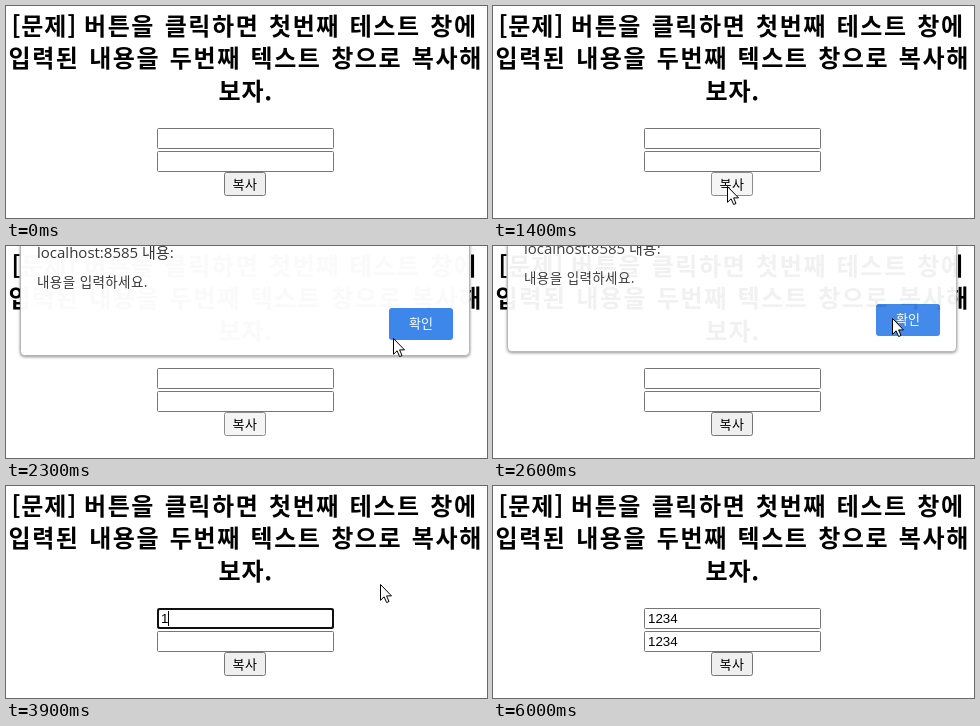
An HTML page for the animation above (6.5 s loop, 481 by 212 pixels).

```html
<!DOCTYPE html>
<html lang="ko">
<head>
<meta charset="utf-8">
<title>복사</title>
<style>
  html, body { margin: 0; width: 100%; height: 100%; overflow: hidden; background: #fff; }
  svg { display: block; width: 481px; height: 212px; }
  text { font-family: "Noto Sans CJK KR", "Noto Sans CJK", sans-serif; white-space: pre; }
  .heading { font-size: 24px; font-weight: 700; letter-spacing: 1.6px; word-spacing: 1.3px; }
  .tight { letter-spacing: .8px; }
  .field { fill: #fff; stroke: #767676; }
  .value { font: 13.333px "Liberation Sans", Arial, sans-serif; }
  .label { font-size: 13px; letter-spacing: .6px; text-anchor: middle; }
  .title { font: 15px "Open Sans", "Noto Sans CJK KR", "Noto Sans CJK", sans-serif; fill: #333; }
  .message { font-size: 13.5px; letter-spacing: .4px; fill: #333; }
  .confirm { font-size: 13px; text-anchor: middle; fill: #fff; }
  #panel { filter: drop-shadow(0 1px 1.5px rgba(0, 0, 0, .45)); }
  #button { fill: #efefef; stroke: #767676; }
  #button.hover { fill: #e5e5e5; stroke: #4f4f4f; }
  #button.active { fill: #f5f5f5; stroke: #8d8d8d; }
</style>
</head>
<body>
<svg viewBox="0 0 481 212">
  <g class="heading">
    <text class="tight" x="5.5" y="29">[문제]</text>
    <text x="78" y="29">버튼을 클릭하면 첫번째 테스트 창에</text>
    <text x="2.5" y="61">입력된 내용을 두번째 텍스트 창으로 복사해</text>
    <text class="tight" x="212.5" y="94">보자.</text>
  </g>

  <rect class="field" x="151.5" y="122.5" width="176" height="20" rx="1"/>
  <rect id="ring" x="152" y="123" width="175" height="19" rx="2" fill="#fff" stroke="#101010" stroke-width="2"/>
  <text id="first" class="value" x="155" y="137"></text>
  <rect id="caret" y="125" width="1" height="15"/>

  <rect class="field" x="151.5" y="145.5" width="176" height="20" rx="1"/>
  <text id="second" class="value" x="155" y="160"></text>

  <rect id="button" x="218.5" y="166.5" width="41" height="23" rx="2"/>
  <text class="label" x="239" y="183">복사</text>

  <g id="dialog">
    <rect id="panel" x="14.5" y="-20" width="449" height="129.5" rx="4" fill="#fff" stroke="#b4b4b4"/>
    <text class="title" x="31" y="12">localhost:8585 내용:</text>
    <text class="message" x="31" y="41">내용을 입력하세요.</text>
    <rect x="383" y="62" width="64" height="32" rx="3" fill="#3a84ea"/>
    <text class="confirm" x="415" y="82">확인</text>
  </g>

  <path id="arrow" d="M.5 .5V16.3L4.1 12.8L6.6 18.5L9 17.5L6.6 11.9H11.5Z" fill="#fff" stroke="#000"/>
  <path id="beam" d="M-3 -8.5H-1L.5 -7.5L2 -8.5H4M.5 -7.5V7.5M-3 8.5H-1L.5 7.5L2 8.5H4" fill="none" stroke="#000"/>
</svg>
<script>
const LOOP = 6500, STEP = 100;
const el = id => document.getElementById(id);
const show = (node, on) => node.setAttribute('visibility', on ? 'visible' : 'hidden');
const move = (node, x, y) => node.setAttribute('transform', `translate(${x} ${y})`);
const within = (t, from, to) => t >= from && t < to;
const ramp = (t, from, to) => Math.min(1, Math.max(0, (t - from) / (to - from)));
const easeOut = k => 1 - (1 - k) ** 1.4;

const places = {
  entry: [441, 32], button: [234, 180], confirm: [399, 72], field: [315, 133],
  rest: [374, 98], copy: [245, 187], exit: [460, 106]
};

// Each leg is one curved sweep of the hand, bent towards a control point.
const legs = [
  { start: 500, end: 1100, from: 'entry', bend: [282, 220], to: 'button' },
  { start: 1800, end: 2500, from: 'button', bend: [375, 130], to: 'confirm' },
  { start: 2600, end: 3000, from: 'confirm', bend: [328, 148], to: 'field' },
  { start: 3200, end: 3400, from: 'field', bend: [345, 118], to: 'rest' },
  { start: 4600, end: 5200, from: 'rest', bend: [310, 235], to: 'copy' },
  { start: 5600, end: 5900, from: 'copy', bend: [350, 175], to: 'exit' }
];

function pointerAt(t) {
  const leg = legs.filter(l => l.start <= t).pop() || legs[0];
  const k = easeOut(ramp(t, leg.start, leg.end));
  const a = places[leg.from], b = leg.bend, c = places[leg.to];
  return a.map((_, i) =>
    Math.round(a[i] * (1 - k) ** 2 + 2 * b[i] * k * (1 - k) + c[i] * k ** 2));
}

function buttonState(t) {
  if (within(t, 1200, 2600) || within(t, 5200, 5300)) return 'active';
  if (within(t, 1000, 1200) || within(t, 5100, 5700)) return 'hover';
  return '';
}

function drawPointer(t) {
  const [x, y] = pointerAt(t);
  const visible = within(t, 500, 6000);
  const inField = within(t, 2900, 3300);
  show(el('arrow'), visible && !inField);
  show(el('beam'), visible && inField);
  move(el('arrow'), x, y);
  move(el('beam'), x, y);
}

function drawDialog(t) {
  const opening = ramp(t, 1400, 1600), closing = ramp(t, 2500, 2800);
  el('dialog').setAttribute('opacity', .98 * opening * (1 - closing ** 3));
  move(el('dialog'), 0, 4 * (opening - 1) - 12 * closing);
}

function drawForm(t) {
  const typed = Math.round(4 * ramp(t, 3800, 4200));
  el('first').textContent = '1234'.slice(0, typed);
  el('second').textContent = t >= 5300 ? '1234' : '';
  show(el('ring'), within(t, 3100, 5200));
  show(el('caret'), within(t, 3100, 3600) || within(t, 3900, 4700));
  el('caret').setAttribute('x', Math.floor(155 + typed * 7.415));
  el('button').setAttribute('class', buttonState(t));
}

function draw() {
  const t = Math.floor(performance.now() % LOOP / STEP) * STEP;
  drawPointer(t);
  drawDialog(t);
  drawForm(t);
  requestAnimationFrame(draw);
}
draw();
</script>
</body>
</html>
```
